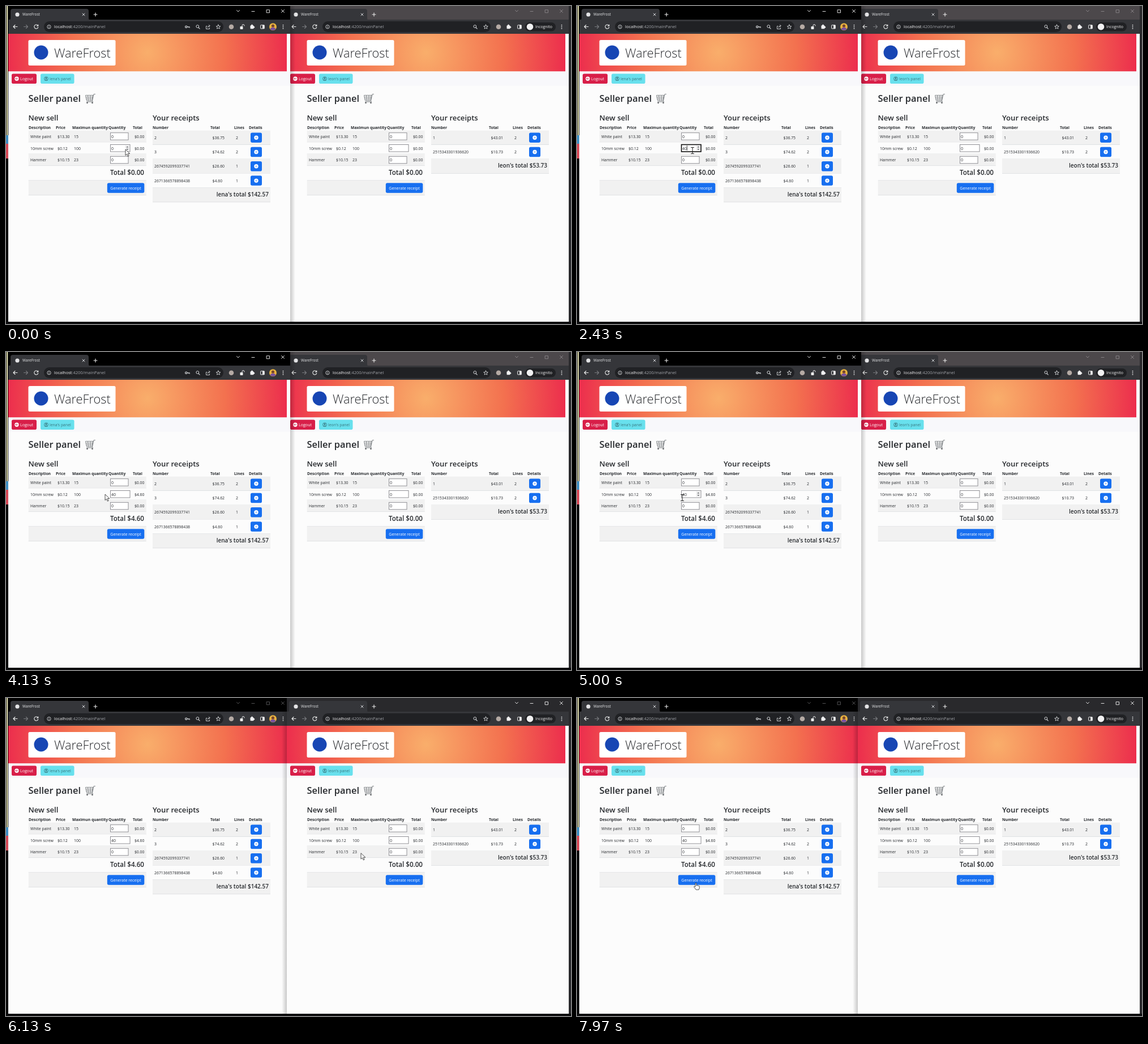
Recreate the animation shown at these times as an HTML page. Size 998 by 561 pixels, loop 8000 ms.

```html
<!DOCTYPE html>
<html lang="en">
<head>
<meta charset="utf-8">
<title>Seller panel</title>
<style>
html, body { margin: 0; width: 100%; height: 100%; overflow: hidden; background: #000; }
svg { display: block; width: 998px; height: 561px; font-family: "Open Sans", "Noto Sans", sans-serif; }
.line { fill: none; stroke-linecap: round; stroke-linejoin: round; }
</style>
</head>
<body>
<svg id="stage" viewBox="0 0 998 561"></svg>
<script>
const LOOP = 8000, SHIFT = 492, INK = '#26292d';

const rect = (x, y, w, h, fill, r = 0, more = '') =>
  `<rect x="${x}" y="${y}" width="${w}" height="${h}" rx="${r}" fill="${fill}" ${more}/>`;
const dot = (x, y, r, fill, more = '') => `<circle cx="${x}" cy="${y}" r="${r}" fill="${fill}" ${more}/>`;
const line = (d, color, w = 1, more = '') =>
  `<path class="line" d="${d}" stroke="${color}" stroke-width="${w}" ${more}/>`;
const text = (x, y, s, size = 6.9, fill = INK, weight = 400, more = '') =>
  `<text x="${x}" y="${y}" font-size="${size}" fill="${fill}" font-weight="${weight}" ${more}>${s}</text>`;
const END = 'text-anchor="end"';

function browser(p) {
  const gray = '#d5d7da', out = [];
  const add = (...parts) => out.push(...parts);
  add(rect(4, 0, 498, 25, p.frame, 0, `id="${p.id}Frame"`),
    '<path d="M5 25q3 0 3-4V9q0-4 4-4h130q4 0 4 4v12q0 4 3 4z" fill="#35363a"/>',
    dot(20, 15, 3.6, '#e4e4e6'), text(29, 17.3, 'WareFrost', 6.5, '#e6e7e9'),
    line('M135 13l4 4m0-4l-4 4', gray), line('M155 15h6m-3-3v6', '#eee', 1.1),
    `<g id="${p.id}Ctl">`,
    line('M407.500 7.500l2.500 2.500 2.500-2.500M434 9.500h5M460.500 6.800h5v5h-5zM486.500 6.500l5 5m0-5l-5 5', 'currentColor', .9),
    '</g>',
    rect(4, 24, 498, 25, '#35363a'), rect(67, 27, p.barEnd - 67, 19, '#202124', 9.500),
    line('M20 36.500h-7m3-3l-3 3 3 3', '#eceded', 1.1),
    line('M31.500 36.500h7m-3-3l3 3-3 3', '#77797d', 1.1),
    line('M56.500 35a3.500 3.500 0 1 0 .2 2.500M56.800 33v2.300h-2.300', '#eceded', 1.1),
    dot(76, 36.700, 3.2, 'none', `stroke="${gray}" stroke-width=".9"`),
    line('M76 36.500v1.700M76 35v.1', gray, .9),
    text(85, 39.4, 'localhost<tspan fill="#a0a3a8">:4200/mainPanel</tspan>', 7.5, '#f2f2f3'));

  const zoom = x => dot(x - .7, 36, 2.4, 'none', `stroke="${gray}"`) + line(`M${x + 1} 38l2.200 2.200`, gray, 1.1);
  const star = x => line(`M${x} 33l1.100 2.500 2.700.2-2.100 1.800.7 2.600-2.400-1.400-2.400 1.400.7-2.600-2.100-1.800 2.700-.2z`, gray, .9);
  add(zoom(p.icons[0]), star(p.icons[1]), dot(p.icons[2], 36.700, 4.300, '#b5aaa4'));
  const puzzle = p.icons[3], side = p.icons[4];
  add(rect(puzzle - 3.5, 34.2, 6, 6, '#f1f1f2', 1), dot(puzzle - .5, 34, 1.5, '#f1f1f2'), dot(puzzle + 2.700, 37.200, 1.500, '#f1f1f2'),
    rect(side - 3.300, 33.700, 6.600, 6.200, 'none', .5, 'stroke="#eee"'), rect(side, 33.700, 3.300, 6.200, '#eee'));
  if (p.id === 'L') {
    add(dot(318.300, 36.700, 1.700, 'none', `stroke="${gray}" stroke-width="1.200"`), line('M320.200 36.700h4v1.500m-1.800-1.500v1', gray, 1.1),
      line('M355 35.500h-1.500v5h6v-2M356 38q.3-3 4-3m-1.600-1.800l1.800 1.800-1.800 1.800', gray, .9),
      rect(413.500, 36, 5, 5, '#eee', .7), line('M417 36v-1.500q.2-2 2-2t2 2v.5', '#eee', 1),
      dot(471.500, 36.700, 6.500, '#e8b23f'), dot(471.500, 35, 2.600, '#75452f'),
      '<path d="M466.800 41q.7-3.300 4.700-3.300t4.700 3.300q-4.700 4.200-9.400 0z" fill="#7850a0"/>');
  } else {
    add(rect(425, 29, 54, 15.500, '#202124', 7.700), dot(433.500, 36.700, 5.800, '#f1f1f2'), text(443, 39.2, 'Incognito', 6.9, '#f1f1f2'));
  }
  for (const y of [33.700, 36.700, 39.700]) add(dot(489.500, y, .9, '#e4e5e7'));

  // page header
  add(rect(4, 49, 498, 508, '#fcfcfc'), rect(4, 49, 492, 66.500, 'url(#glow)'),
    rect(39.500, 60, 154, 45, '#fff', 2.500), dot(62, 82, 12.500, '#1746b4'),
    text(85, 91, 'WareFrost', 21.8, '#26282c', 300),
    rect(4, 115.500, 498, 25, '#f8f8fb'),
    rect(10, 119.500, 44, 17.500, '#d81f49', 2.800), dot(19, 128.200, 3.700, '#fff'),
    line('M21 128.200h-4m1.500-1.500l-1.500 1.500 1.500 1.500', '#d81f49', .8), text(25, 130.700, 'Logout', 7.1, '#fff'),
    rect(61, 119.500, 59.500, 17.500, '#68e0ed', 2.800),
    dot(71, 128.200, 3.400, 'none', 'stroke="#356f78" stroke-width=".8"'), dot(71, 127.300, 1.300, '#356f78'),
    line('M68.800 130.600q2.200-2 4.400 0', '#356f78', .9), text(77, 130.700, p.user + "'s panel", 6.87, '#39767f'),
    text(39.500, 169, 'Seller panel', 16.4, INK, 600),
    line('M157.500 155.500h-2.500l-2.500 11.500h-10l-2-9.500h14.500M141 160.700h13m-12.500 3.200h12M144.500 157.500l1 9.500m3.500-9.500v9.500m4-9.500l-1 9.500M152.500 167l1 2h-11', '#85898c', 1),
    dot(143.500, 170.800, 1.300, '#55585b'), dot(152.500, 170.800, 1.300, '#55585b'),
    text(39.500, 201.500, 'New sell', 13.1, INK, 600), text(259, 201.500, 'Your receipts', 13.1, INK, 600));

  const heads = [[40, 'Description'], [88, 'Price'], [117, 'Maximun quantity'], [181, 'Quantity'], [224, 'Total'],
    [259, 'Number'], [361, 'Total'], [403, 'Lines'], [429, 'Details']];
  for (const [x, s] of heads) add(text(x, 216.500, s, 6.8, INK, 700));

  const row = (x, y, h, shaded) =>
    rect(x, y, 208, h, shaded ? '#f1f1f1' : '#fcfcfc') + rect(x, y + h - .7, 208, .7, '#d9dbde');

  // sale form
  [['White paint', '$13.30', 15, 32], ['10mm screw', '$0.12', 100, 35], ['Hammer', '$10.15', 23, 32]].forEach(([name, price, max, w], i) => {
    const y = 219.700 + i * 20.800, mid = y + 13, tag = i === 1 ? p.id : '';
    add(row(39.700, y, 20.800, i % 2 === 0), text(43, mid, name), text(91, mid, price), text(120, mid, max),
      rect(184.500, y + 4, w - .5, 12.500, '#fff', 0, `stroke="#85858a" stroke-width=".9" ${tag && `id="${tag}Box"`}`),
      text(186, mid, 0, 6.9, INK, 400, tag && `id="${tag}Qty"`),
      text(244.500, mid, '$0.00', 6.9, INK, 400, END + (tag && ` id="${tag}Sum"`)));
  });
  add(row(39.700, 282.100, 26, false), text(244, 298, 'Total $0.00', 11.6, INK, 600, `${END} id="${p.id}Total"`),
    row(39.700, 308.100, 26, true), rect(178.800, 312.300, 65.500, 17.500, '#176ff0', 2.800),
    text(184.300, 323.700, 'Generate receipt', 7, '#fff'));

  // receipts
  let y = 219.700;
  p.receipts.forEach(([no, sum, lines], i) => {
    add(row(259, y, 25.300, i % 2 === 0), text(262, y + 15, no), text(364.500, y + 15, sum), text(406, y + 15, lines),
      rect(432, y + 3.700, 20, 17.500, '#176ff0', 2.800), dot(442, y + 12.500, 3.700, '#fff'),
      line(`M440.500 ${y + 12.500}h3m-1.500-1.500v3`, '#6ca4f5', .8));
    y += 25.300;
  });
  add(row(259, y, 25.300, true), text(464, y + 15, `${p.user}'s total ${p.total}`, 10, INK, 600, END));
  return out.join('');
}

const left = browser({ id: 'L', user: 'lena', frame: '#000', barEnd: 384, icons: [339, 375, 398, 435, 453], total: '$142.57',
  receipts: [['2', '$36.75', 2], ['3', '$74.62', 2], ['2674592099337741', '$26.60', 1], ['2671366578898438', '$4.60', 1]] });
const right = browser({ id: 'R', user: 'leon', frame: '#4c484b', barEnd: 364, icons: [337, 355.500, 378, 396, 415], total: '$53.73',
  receipts: [['1', '$43.01', 2], ['2515343301936620', '$10.73', 2]] });

const stage = document.getElementById('stage');
stage.innerHTML = `<defs>
  <radialGradient id="glow" gradientUnits="userSpaceOnUse" cx="250" cy="82" r="250">
    <stop offset="0" stop-color="#f9ae6b"/><stop offset=".55" stop-color="#f3714f"/><stop offset="1" stop-color="#ec2c4d"/>
  </radialGradient>
  <linearGradient id="shade"><stop stop-color="#000" stop-opacity=".2"/><stop offset="1" stop-color="#000" stop-opacity="0"/></linearGradient>
  <clipPath id="cutL"><rect id="cutRect" x="4" y="0" width="498" height="561"/></clipPath>
  <clipPath id="cutR"><rect x="4" y="0" width="498" height="561"/></clipPath>
  </defs>
  ${rect(0, 0, 998, 561, '#050505')}
  <g transform="translate(${SHIFT})" clip-path="url(#cutR)">${right}</g>
  <g clip-path="url(#cutL)">${left}
    <g id="spin">${rect(210.500, 246, 7.500, 9.500, '#ededee')}<path d="M212.500 249.500l1.800-2 1.800 2zm0 2.500l1.800 2 1.800-2z" fill="#55585c"/></g>
    <path id="caret" stroke="#111" stroke-width=".8"/>
  </g>
  <path id="shadow" fill="url(#shade)" d="M0 0h9v557h-9z"/>
  ${rect(994, 0, 4, 561, '#29292c')}${rect(0, 557, 998, 4, '#0b0b0d')}
  ${rect(1, 0, 2, 228, '#f1efbd')}${rect(0, 228, 4, 15, '#3f8fc4')}${rect(0, 243, 4, 26, '#d84a58')}
  <g id="cursor">
    <path id="arrow" d="M0 0v10.500l2.500-2.300 1.800 4 1.800-.8-1.800-3.900h3.500z" fill="#fff" stroke="#222" stroke-width=".8"/>
    <path id="beam" class="line" d="M-2.500-5.500h1.700q.8 0 .8.800 0-.8.800-.8h1.700M0-5v10M-2.500 5.500h1.700q.8 0 .8-.8 0 .8.800.8h1.700" stroke="#111" stroke-width=".9"/>
    <path id="hand" d="M-1 .8q1-1.300 2 0v4.200q1-1 2 .2 1-.8 1.700.3 1.300-.5 1.500.8v2.700q-.2 2-1.200 3.200h-4.800q-1.500-2.400-3.500-4.600-.2-1.600 1.300-1.300l1 1z" fill="#fff" stroke="#222" stroke-width=".8"/>
  </g>`;

const el = {};
stage.querySelectorAll('[id]').forEach(n => el[n.id] = n);
const show = (node, on) => node.setAttribute('visibility', on ? 'visible' : 'hidden');
const set = (node, attrs) => { for (const k in attrs) node.setAttribute(k, attrs[k]); };
const write = (node, s) => { if (node.textContent !== s) node.textContent = s; };

// pointer stops: time, x, y
const path = [[0, 211, 253], [30, 211, 253], [300, 204, 255], [2630, 204, 255], [2920, 202, 391], [3020, 202, 391],
  [3400, 212, 272], [3500, 212, 270], [4130, 175, 251], [4350, 175, 251], [5000, 186, 257], [5130, 187, 257],
  [5830, 618, 250], [5960, 618, 250], [6350, 640, 308], [6770, 624, 255], [6950, 655, 258], [7600, 407, 368], [7970, 210, 326], [LOOP, 210, 326]];

function pointer(t) {
  const i = path.findIndex(k => k[0] > t), [t0, x0, y0] = path[i - 1], [t1, x1, y1] = path[i];
  const u = (t - t0) / (t1 - t0), e = u * u * (3 - 2 * u);
  return [x0 + (x1 - x0) * e, y0 + (y1 - y0) * e];
}
const within = (x, y, x0, y0, x1, y1) => x >= x0 && x <= x1 && y >= y0 && y <= y1;

function draw(t) {
  const [x, y] = pointer(t);
  const focus = t >= 250 && t < 2940, committed = t >= 2940, rightOn = t >= 5900;
  const qty = t < 1000 ? '0' : t < 1220 ? '' : t < 2430 ? '4' : '40';
  const caret = focus && (t < 780 || t >= 1220 && t < 1950 || t >= 2430);

  write(el.LQty, qty);
  write(el.LSum, committed ? '$4.60' : '$0.00');
  write(el.LTotal, committed ? 'Total $4.60' : 'Total $0.00');
  set(el.LBox, { stroke: focus ? '#111' : '#85858a', 'stroke-width': focus ? 1.6 : .9 });
  show(el.spin, focus || within(x, y, 184, 244, 219, 258));
  set(el.caret, { d: `M${186.400 + qty.length * 3.950} 246v9` });
  show(el.caret, caret);

  set(el.cutRect, { width: rightOn ? SHIFT : 498 });
  set(el.shadow, { transform: rightOn ? 'translate(496) scale(-1 1)' : 'translate(502)' });
  set(el.RFrame, { fill: rightOn ? '#29292c' : '#4c484b' });
  set(el.LCtl, { color: rightOn ? '#5c5c5e' : '#f4f4f4' });
  set(el.RCtl, { color: rightOn ? '#f4f4f4' : '#8c878b' });

  const hand = within(x, y, 179, 312, 244, 330);
  const beam = within(x, y, 184, 244, 210, 258) || within(x, y, 611, 245, 623, 256);
  set(el.cursor, { transform: `translate(${x} ${y})` });
  show(el.hand, hand);
  show(el.beam, beam);
  show(el.arrow, !hand && !beam);
}

function tick() {
  draw(performance.now() % LOOP);
  requestAnimationFrame(tick);
}
tick();
</script>
</body>
</html>
```
